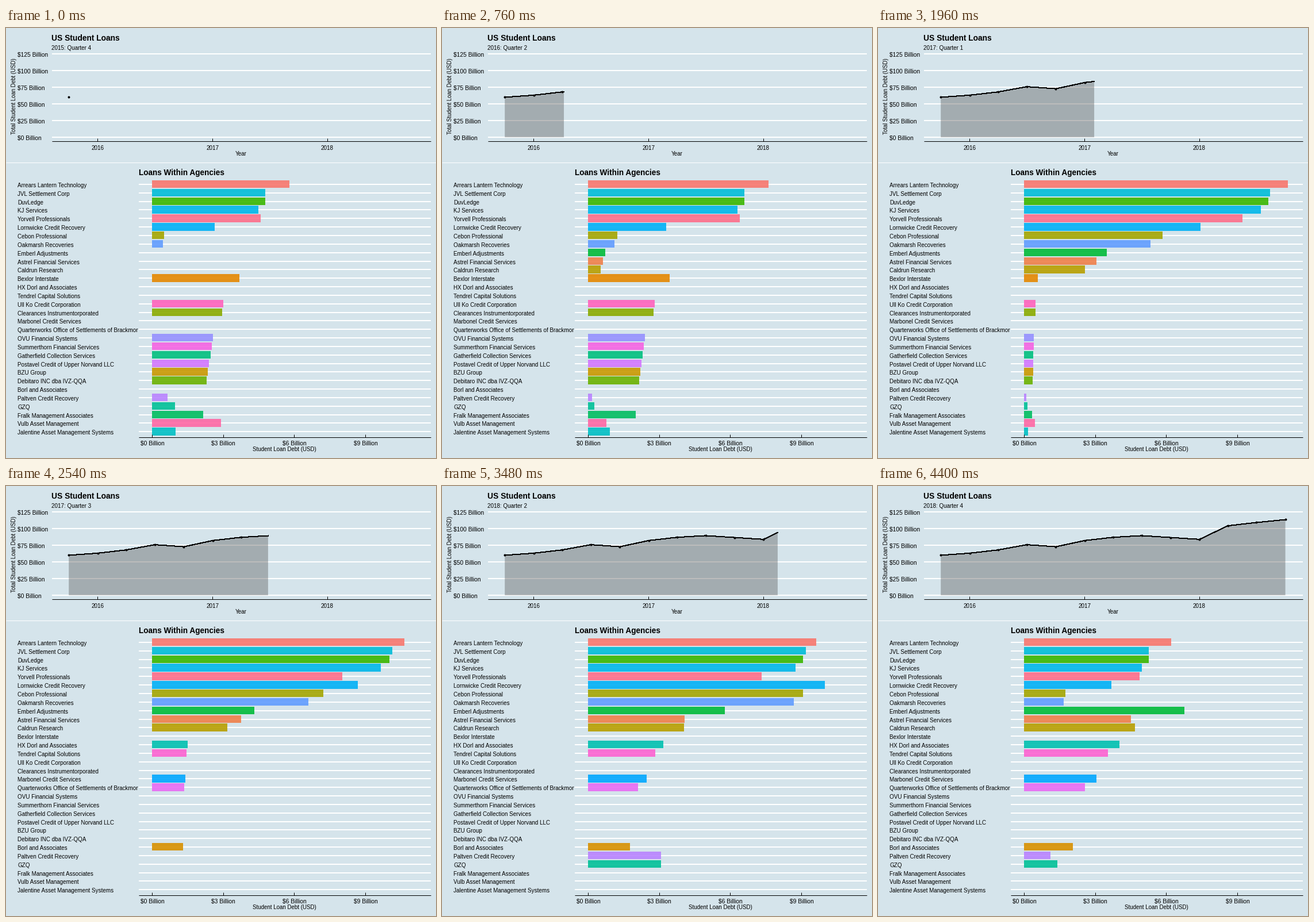
Animation, 748 px wide and 748 px high, one loop 4420 ms. Source, as a matplotlib script:

```python
import numpy as np
import matplotlib.pyplot as plt
from matplotlib.animation import FuncAnimation

SIZE, DPI = 748, 100
FRAMES, STEP = 221, 17          # frames per loop, frames per quarter
HOLD = 9                        # frames a quarter rests before tweening
BG = "#d5e4eb"
PT = 72 / DPI                   # points per pixel
BAR_X, ROW_Y, ROW_GAP = 254, 271.95, 14.84
BASE_Y, TICK_Y = 190, 29        # zero line and spacing of the upper grid
BILLION = 41.23                 # bar pixels per billion

plt.rcParams["font.family"] = "Liberation Sans"

AGENCIES = [
    "Arrears Lantern Technology", "JVL Settlement Corp", "DuvLedge",
    "KJ Services", "Yorvell Professionals", "Lornwicke Credit Recovery",
    "Cebon Professional", "Oakmarsh Recoveries", "Emberl Adjustments",
    "Astrel Financial Services", "Caldrun Research", "Bexlor Interstate",
    "HX Dorl and Associates", "Tendrel Capital Solutions",
    "Ull Ko Credit Corporation", "Clearances Instrumentorporated",
    "Marbonel Credit Services",
    "Quarterworks Office of Settlements of Brackmor",
    "OVU Financial Systems", "Summerthorn Financial Services",
    "Gatherfield Collection Services",
    "Postavel Credit of Upper Norvand LLC", "BZU Group",
    "Debitaro INC dba IVZ-QQA", "Borl and Associates",
    "Paltven Credit Recovery", "GZQ", "Fralk Management Associates",
    "Vulb Asset Management", "Jalentine Asset Management Systems",
]
N = len(AGENCIES)

# Rows by how their loans develop
LEAD = slice(0, 5)
GROW = slice(5, 11)
JOIN = [12, 13, 16, 17, 24]
FADE = [11, 14, 15, *range(18, 24), *range(25, 30)]
DROP = [25, 26, 28]             # fading rows that shrink at once
BACK = [25, 26]                 # fading rows that return later

lead_gap = np.array([0, 42, 42, 54, 50])
late_gap = np.array([0, 21, 26, 41, 108])

base, size, gain, legacy = np.zeros((4, N))
first = np.full(N, 99)          # quarter in which growth starts to show
base[5] = 90
size[GROW] = 268, 298, 272, 178, 155, 131
gain[GROW] = 88, 118, 130, 90, 28, 55
size[JOIN] = np.linspace(62, 54, 5)
gain[JOIN] = np.linspace(93, 28, 5)
gain[BACK] = 163
first[5:8], first[8:11], first[JOIN], first[BACK] = 0, 2, 6, 10
legacy[FADE] = [152, 124, 122, *np.linspace(106, 95, 6), 27, 40, 89, 120, 41]


def curve(q, *points):
    return np.interp(q, *zip(*points))


def quarter(q):
    """Bar lengths in pixels at quarter q, by row."""
    row = np.zeros(N)
    if q < 6:
        row = legacy * curve(q, (0, 1), (3, .9), (4, .2), (5, .16))
        row[DROP] = legacy[DROP] * curve(q, (0, 1), (2, .27), (4, .2), (5, .16))

    rise = curve(q, (0, .07), (2, .17), (4, .63), (6, .87), (7, 1), (9, .945),
                 (11, .945), (12, 1))
    surge = curve(q, (9, 0), (10, .78), (11, 1), (12, 1.12))
    row += np.where(q >= first, base + size * rise + gain * surge, 0)

    peak = curve(q, (0, 239), (2, 314.5), (3, 328), (4, 402.5), (5, 459),
                 (6, 460), (7, 439.5), (9, 408), (12, 375))
    closing = late_gap * (1 - .04 * max(0, q - 7))
    row[LEAD] = peak - lead_gap - (closing - lead_gap) * np.clip((q - 4) / 3, 0, 1)
    return row


# Quarterly totals; each point lands on a whole frame
DATES = np.arange("2015-10", "2018-11", 3, dtype="datetime64[M]")
DAYS = (DATES.astype("datetime64[D]")
        - DATES[0].astype("datetime64[D]")).astype(float)
QUARTERS = [quarter(q) for q in range(len(DATES))]
KEYS = np.round(DAYS / DAYS[-1] * (FRAMES - 1))
LINE_X = 109.2 + 599.4 * DAYS / DAYS[-1]
LINE_Y = np.array([BASE_Y - TICK_Y / 25 * row.sum() / BILLION
                   for row in QUARTERS])


def hue_color(rank):
    """Evenly spaced hue at luminance 65, chroma 100 (CIE LUV to sRGB)."""
    h = np.radians(15 + 360 * rank / N)
    lum, chroma = 65, 100
    u = chroma * np.cos(h) / (13 * lum) + .1978
    v = chroma * np.sin(h) / (13 * lum) + .4683
    y = ((lum + 16) / 116) ** 3
    xyz = np.array([y * 9 * u / (4 * v), y, y * (12 - 3 * u - 20 * v) / (4 * v)])
    lin = np.array([[3.2406, -1.5372, -.4986],
                    [-.9689, 1.8758, .0415],
                    [.0557, -.2040, 1.0570]]) @ xyz
    lin = np.clip(lin, 0, 1)
    return np.where(lin <= .0031308, 12.92 * lin,
                    1.055 * lin ** (1 / 2.4) - .055)


fig = plt.figure(figsize=(SIZE / DPI, SIZE / DPI), dpi=DPI, facecolor=BG)
ax = fig.add_axes([0, 0, 1, 1])
ax.axis("off")


def label(x, y, text, px=9.85, **kw):
    return ax.text(x, y, text, fontsize=px * PT, va="baseline", **kw)


def rule(x, y, color, px, z):
    ax.plot(x, y, color=color, lw=px * PT, zorder=z, solid_capstyle="butt")


def axis(x0, y, ticks):
    rule([x0, 739], [y, y], "black", 1, 6)
    for x in ticks:
        rule([x, x], [y - 5, y], "black", 1, 6)


# Upper chart
label(79.5, 22, "US Student Loans", 13.8, weight="bold")
subtitle = label(79.5, 38, "")
for i in range(6):
    y = BASE_Y - TICK_Y * i
    rule([80, 739], [y, y], "white", 2, 1)
    label(20.5, y + 5, f"${25 * i} Billion", 10.3)
year_ticks = LINE_X[1::4] - .5
axis(80, 197, year_ticks)
for x, year in zip(year_ticks, (2016, 2017, 2018)):
    label(x, 212, str(year), ha="center")
label(409, 222, "Year", ha="center")
label(17.5, 119, "Total Student Loan Debt (USD)", 9.7, ha="center",
      rotation=90, rotation_mode="anchor")
rule([0, SIZE], [234, 234], "white", 1, 1)

area, = ax.fill([0, 0, 0], [0, 0, 0], color="#595959", alpha=.4, lw=0,
                zorder=2)
line, = ax.plot([], [], color="black", lw=PT, zorder=3, antialiased=False)
dots, = ax.plot([], [], "o", color="black", ms=4 * PT, mew=0, zorder=4)

# Lower chart
label(231, 256, "Loans Within Agencies", 13.6, weight="bold")
rows_y = ROW_Y + ROW_GAP * np.arange(N)
for name, y in zip(AGENCIES, rows_y):
    rule([231, 739], [y, y], "white", 2, 1)
    label(20.5, y + 5, name)
ranking = sorted(AGENCIES, key=str.lower)
bars = ax.barh(rows_y - .3, QUARTERS[0], left=BAR_X, height=.9 * ROW_GAP,
               lw=0, alpha=.9, zorder=2,
               color=[hue_color(ranking.index(name)) for name in AGENCIES])
money_ticks = [BAR_X + 3 * BILLION * i for i in range(4)]
axis(231, 712, money_ticks)
for i, x in enumerate(money_ticks):
    label(x + .5, 726, f"${3 * i} Billion", 10.3, ha="center")
label(484.5, 736.5, "Student Loan Debt (USD)", 9.8, ha="center")

ax.set_xlim(0, SIZE)
ax.set_ylim(SIZE, 0)


def bar_lengths(k, phase):
    """Rows present in both quarters tween; the others switch hard."""
    now, after = QUARTERS[k], QUARTERS[(k + 1) % len(QUARTERS)]
    t = max(0, phase - HOLD) / (STEP - HOLD)
    return np.where((now > 0) & (after > 0), now + (after - now) * t, now)


def draw(frame):
    k, phase = divmod(frame, STEP)
    subtitle.set_text(f"{2015 + (k + 3) // 4}: Quarter {(k + 3) % 4 + 1}")

    seen = KEYS <= frame
    xs = np.append(LINE_X[seen], np.interp(frame, KEYS, LINE_X))
    ys = np.append(LINE_Y[seen], np.interp(frame, KEYS, LINE_Y))
    line.set_data(xs, ys)
    dots.set_data(LINE_X[seen], LINE_Y[seen])
    area.set_xy(np.column_stack([np.r_[xs[0], xs, xs[-1]],
                                 np.r_[BASE_Y, ys, BASE_Y]]))

    for bar, length in zip(bars, bar_lengths(k, phase)):
        bar.set_width(length)
        bar.set_visible(length > 0)
    return [subtitle, area, line, dots, *bars]


anim = FuncAnimation(fig, draw, frames=FRAMES, interval=20, repeat=True,
                     repeat_delay=0)
plt.show()
```
